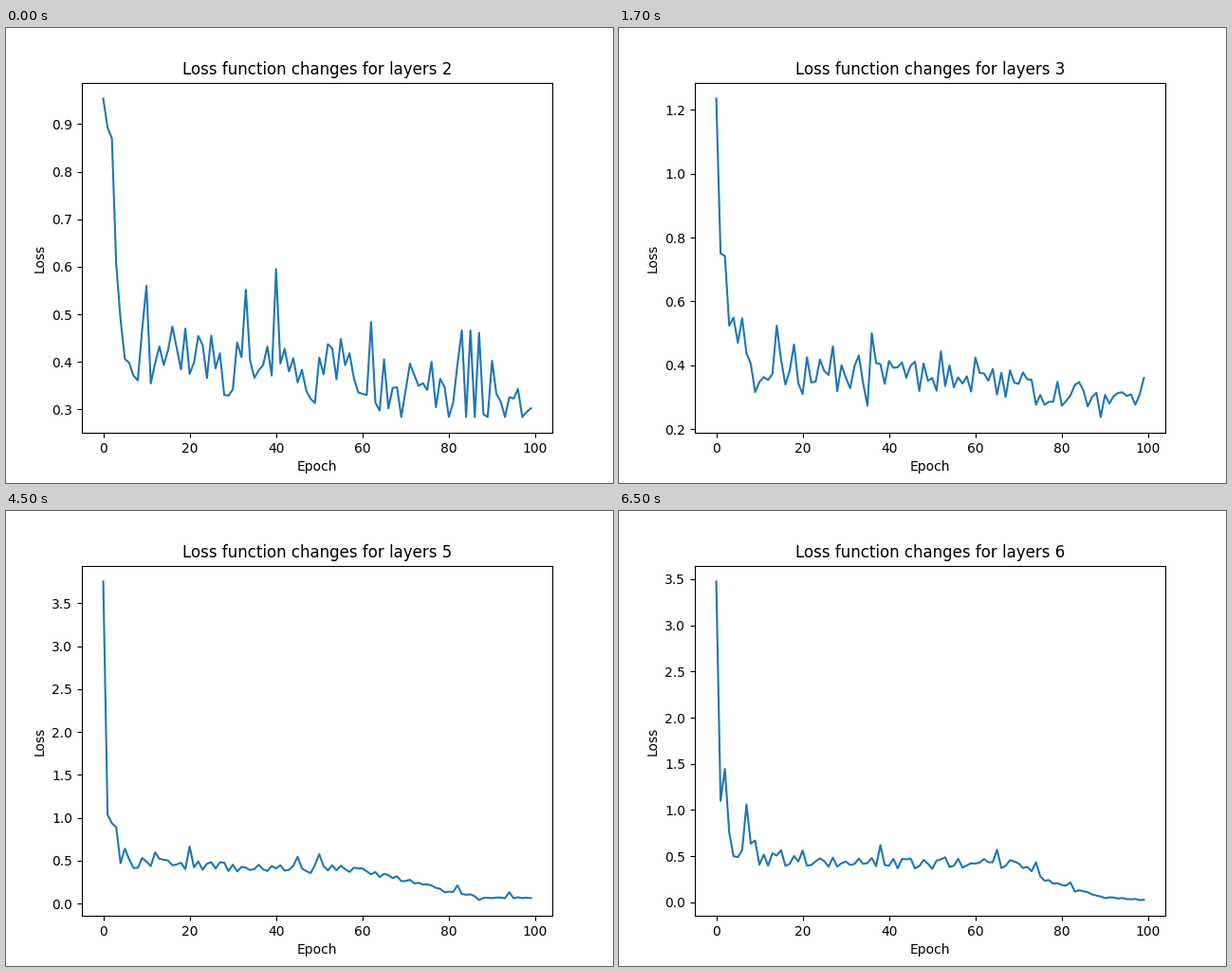
Recreate the animation shown at these times as a matplotlib script. Size 640 px wide and 480 px high, loop 8000 ms.

```python
import matplotlib.pyplot as plt
import numpy as np
from matplotlib.animation import FuncAnimation

EPOCHS = np.arange(100)
KNOTS = (10, 35, 60, 70, 80, 90, 99)  # epochs where the trend bends
INTERVAL = 500  # ms
FRAMES = 16


def loss_curve(seed, drop, trend, peaks, spread):
    """Steep first drop, then a noisy trend with a few marked peaks and dips."""
    rng = np.random.default_rng(seed)
    level = np.interp(EPOCHS, KNOTS, trend)
    loss = level * (1 + rng.uniform(-spread, spread, EPOCHS.size))
    loss[:len(drop)] = drop
    loss[list(peaks)] = list(peaks.values())
    return np.clip(loss, min(peaks.values()), drop[0])


curves = {
    2: loss_curve(
        2, drop=(.954, .893, .87, .605, .49, .406, .398, .371, .361, .468),
        trend=(.41, .38, .38, .34, .34, .34, .34),
        peaks={10: .56, 19: .47, 33: .552, 40: .595, 62: .484, 69: .284,
               83: .466, 85: .466, 87: .461},
        spread=.19),
    3: loss_curve(
        3, drop=(1.2355, .75, .742, .524, .549, .47, .547, .437, .404),
        trend=(.36, .38, .35, .33, .31, .29, .31),
        peaks={14: .524, 18: .465, 27: .459, 35: .273, 36: .5, 52: .443,
               60: .424, 89: .2375, 99: .36},
        spread=.16),
    4: loss_curve(
        4, drop=(2.15, 1, .953, .967, .53, .82, .46, .697, .7, .61),
        trend=(.45, .44, .44, .43, .38, .25, .11),
        peaks={13: .603, 19: .594, 38: .585, 54: .672, 68: .322, 72: .547,
               77: .495, 90: .168, 99: .095},
        spread=.15),
    5: loss_curve(
        5, drop=(3.755, 1.035, .935, .89, .47, .64, .515),
        trend=(.47, .42, .39, .27, .13, .06, .07),
        peaks={12: .595, 20: .665, 45: .545, 50: .575, 82: .21, 87: .04,
               94: .13},
        spread=.13),
    6: loss_curve(
        6, drop=(3.475, 1.1, 1.445, .755, .5, .49, .565, 1.06, .635, .67),
        trend=(.47, .42, .43, .39, .17, .05, .03),
        peaks={15: .565, 20: .56, 38: .62, 65: .57, 74: .435, 82: .215,
               98: .025},
        spread=.15),
}

fig, ax = plt.subplots(figsize=(6.4, 4.8), dpi=100)


def draw(frame):
    # Each chart holds for four frames; the first one is cut short
    layers = 2 + (frame + 3) // 4
    ax.clear()
    ax.plot(EPOCHS, curves[layers])
    ax.set_title(f"Loss function changes for layers {layers}")
    ax.set_xlabel("Epoch")
    ax.set_ylabel("Loss")


anim = FuncAnimation(fig, draw, frames=FRAMES, interval=INTERVAL, repeat=True)
plt.show()
```
